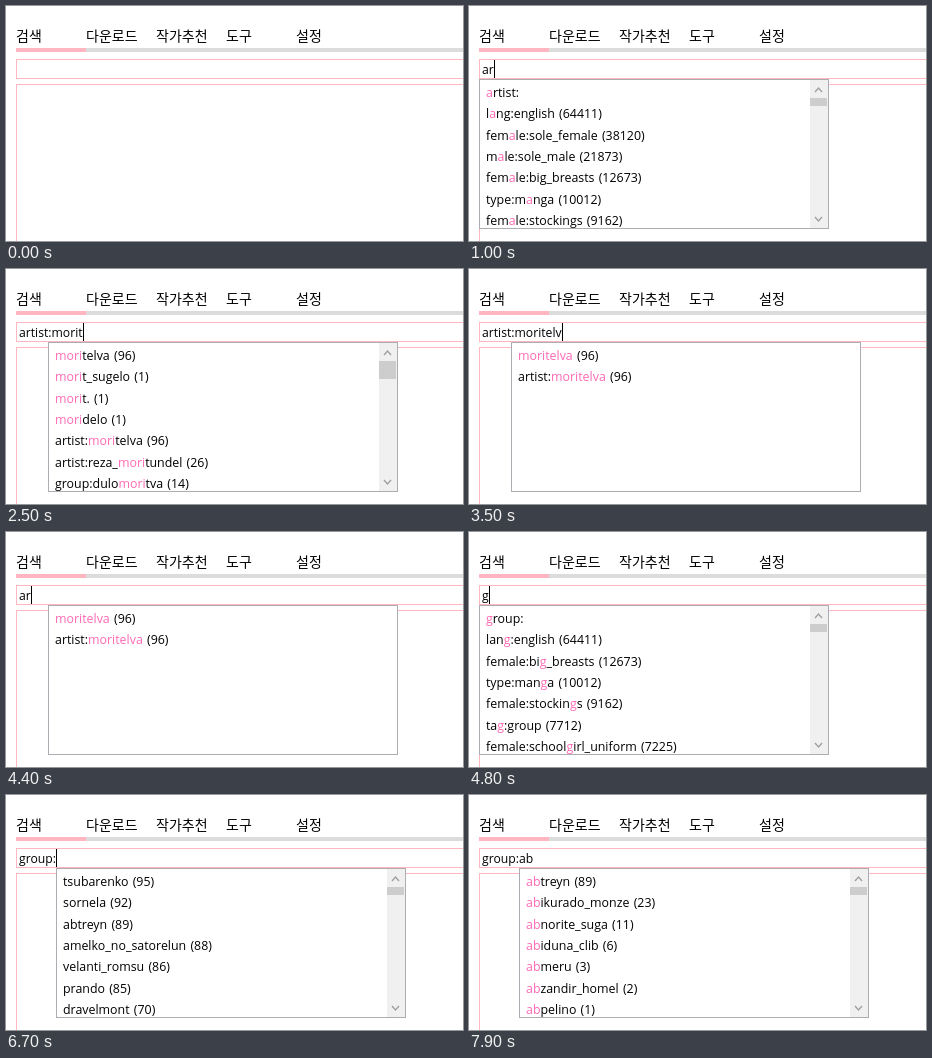
An HTML page that plays this animation: 457x235 px, repeating every 8000 ms.

```html
<!DOCTYPE html>
<html lang="ko">
<head>
<meta charset="utf-8">
<title>Tag search</title>
<style>
  html, body { margin: 0; width: 100%; height: 100%; overflow: hidden; background: #fff; }
  svg { display: block; width: 457px; height: 235px; }
  text { white-space: pre; font-family: "Open Sans", "Noto Sans", sans-serif; }
  .tabs text { font: 14px "Noto Sans CJK KR", "Noto Sans CJK", sans-serif; }
  .field { fill: #fff; stroke: #ffb6c1; }
  #typed { font-size: 12.2px; }
  #rows text { font-size: 12.4px; word-spacing: 1px; }
  #rows tspan { fill: #ff69b4; }
  .arrow { fill: none; stroke: #a0a0a0; stroke-width: 1.4; }
</style>
</head>
<body>
<svg viewBox="0 0 457 235">
  <g class="tabs">
    <text x="10" y="35">검색</text>
    <text x="80" y="35">다운로드</text>
    <text x="150" y="35">작가추천</text>
    <text x="220" y="35">도구</text>
    <text x="290" y="35">설정</text>
  </g>
  <rect x="10" y="42" width="460" height="4" fill="#dcdcdc"/>
  <rect x="10" y="42" width="70" height="4" fill="#ffb6c1"/>
  <rect class="field" x="10.5" y="53.5" width="460" height="19"/>
  <rect class="field" x="10.5" y="78.5" width="460" height="180"/>
  <text id="typed" x="13" y="68"></text>
  <rect id="caret" y="54" width="1" height="18"/>
  <g id="popup">
    <clipPath id="inside"><rect x="1" y="74" width="348" height="148"/></clipPath>
    <rect x=".5" y="73.5" width="349" height="149" fill="#fff" stroke="#abadb3"/>
    <g id="rows" clip-path="url(#inside)"></g>
    <g id="scroll">
      <rect x="331" y="74" width="18" height="148" fill="#f0f0f0"/>
      <rect id="thumb" x="331" y="92" width="17" fill="#cdcdcd"/>
      <path class="arrow" d="M336 86l3.5-4 3.5 4M336 211l3.5 4 3.5-4"/>
    </g>
  </g>
</svg>
<script>
const LOOP = 8000, ROW = 21.33, BLINK = 500;
const $ = id => document.getElementById(id);

// "name count" lists, highest count first
const parse = list => list.trim().split(/\s*,\s*/).map(item => {
  const [name, count] = item.split(' ');
  return { name, count: +count };
});
const tags = parse(`lang:english 64411, female:sole_female 38120, male:sole_male 21873,
  female:big_breasts 12673, type:manga 10012, female:stockings 9162, tag:group 7712,
  female:schoolgirl_uniform 7225, female:glasses 6108, type:artistcg 1996,
  tag:full_color 1840, female:dark_skin 1312, character:martial_artist 7`);
const catalog = {
  artist: parse(`sutenaro 248, velkino 231, hadoruna 215, tobelshi 198, rukanelo 176,
    ponzaru 163, kelunato 151, moritelva 96, reza_moritundel 26,
    morit_sugelo 1, morit. 1, moridelo 1`),
  group: parse(`tsubarenko 95, sornela 92, abtreyn 89, amelko_no_satorelun 88,
    velanti_romsu 86, prando 85, dravelmont 70, amerolunda_to_wasukeni_no 61,
    abikurado_monze 23, dulomoritva 14, abnorite_suga 11, abiduna_clib 6,
    abmeru 3, abzandir_homel 2, abpelino 1`)
};
const prefixes = ['artist:', 'group:', 'character:'];
const popupX = { artist: 42, group: 50 };

function searchAll(query) {
  const named = Object.entries(catalog).flatMap(([kind, list]) => list
    .filter(e => e.name.includes(query))
    .map(e => ({ name: kind + ':' + e.name, count: e.count, from: kind.length + 1 })));
  return tags.filter(e => e.name.includes(query)).concat(named)
    .sort((a, b) => b.count - a.count);
}

function suggest(input) {
  const [kind, query] = input.includes(':') ? input.split(':') : ['', input];
  const list = kind
    ? catalog[kind].filter(e => e.name.startsWith(query))
    : prefixes.filter(p => p.startsWith(query)).map(name => ({ name }));
  return { x: popupX[kind] || 10, query, rows: query ? list.concat(searchAll(query)) : list };
}

// [time, typed text, text the popup answers]; the popup follows on key release
const word = 'artist:moritelva';
const steps = [
  [0, '', ''],
  [800, 'a', ''], [900, 'a', 'a'], [1000, 'ar', 'a'],
  [1400, 'art', 'ar'], [1500, 'artis', 'art'], [1600, 'artist', 'artist'],
  [1800, 'artist:', 'artist'], [1900, 'artist:', 'artist:'],
  [2100, 'artist:m', 'artist:'], [2300, 'artist:mo', 'artist:m'],
  [2400, 'artist:mori', 'artist:mo'], [2500, 'artist:morit', 'artist:mori'],
  [2600, 'artist:morit', 'artist:morit'], [2700, 'artist:morite', 'artist:morit'],
  [2800, 'artist:morite', 'artist:morite'], [2900, 'artist:moritel', 'artist:morite'],
  [3000, 'artist:moritelv', 'artist:moritel'], [3100, word, word],
  [3500, word.slice(0, -1), word]
];
for (let i = 0; i < 5; i++) steps.push([4000 + 100 * i, word.slice(0, 14 - 3 * i), word]);
steps.push(
  [4500, '', ''], [4700, 'g', ''], [4800, 'g', 'g'], [4900, 'gr', 'g'],
  [5000, 'gro', 'gr'], [5100, 'group', 'gro'], [5200, 'group', 'group'],
  [5700, 'group:', 'group'], [5800, 'group:', 'group:'],
  [7100, 'group:a', 'group:'], [7200, 'group:a', 'group:a'],
  [7400, 'group:ab', 'group:a'], [7500, 'group:ab', 'group:ab']
);

function rowMarkup({ name, count, from = 0 }, query, i) {
  const at = query ? name.indexOf(query, from) : 0;
  const end = at + query.length;
  const label = name.slice(0, at) + `<tspan>${name.slice(at, end)}</tspan>` + name.slice(end);
  return `<text x="7" y="${91 + i * ROW}">${label}${count ? ` (${count})` : ''}</text>`;
}

function drawPopup(input) {
  $('popup').style.display = input ? '' : 'none';
  if (!input) return;
  const { x, query, rows } = suggest(input);
  $('popup').setAttribute('transform', `translate(${x})`);
  $('rows').innerHTML = rows.slice(0, 7).map((row, i) => rowMarkup(row, query, i)).join('');
  $('scroll').style.display = rows.length < 7 ? 'none' : '';
  $('thumb').setAttribute('height', query.length > 3 ? 18 : 8);
}

let shown = -1;
function draw(t) {
  let index = 0, lastKey = -BLINK - 100;
  steps.forEach(([time, typed], i) => {
    if (time > t) return;
    index = i;
    if (i && typed !== steps[i - 1][1]) lastKey = time;
  });
  if (index !== shown) {
    const [, typed, answered] = steps[index];
    $('typed').textContent = typed;
    const width = typed ? $('typed').getComputedTextLength() : 0;
    $('caret').setAttribute('x', 13 + Math.round(width));
    drawPopup(answered);
    shown = index;
  }
  const visible = t >= 400 && (t < 800 || (t - lastKey) % (2 * BLINK) < BLINK);
  $('caret').style.display = visible ? '' : 'none';
}

const start = performance.now();
function tick() {
  draw((performance.now() - start) % LOOP);
  requestAnimationFrame(tick);
}
tick();
</script>
</body>
</html>
```
